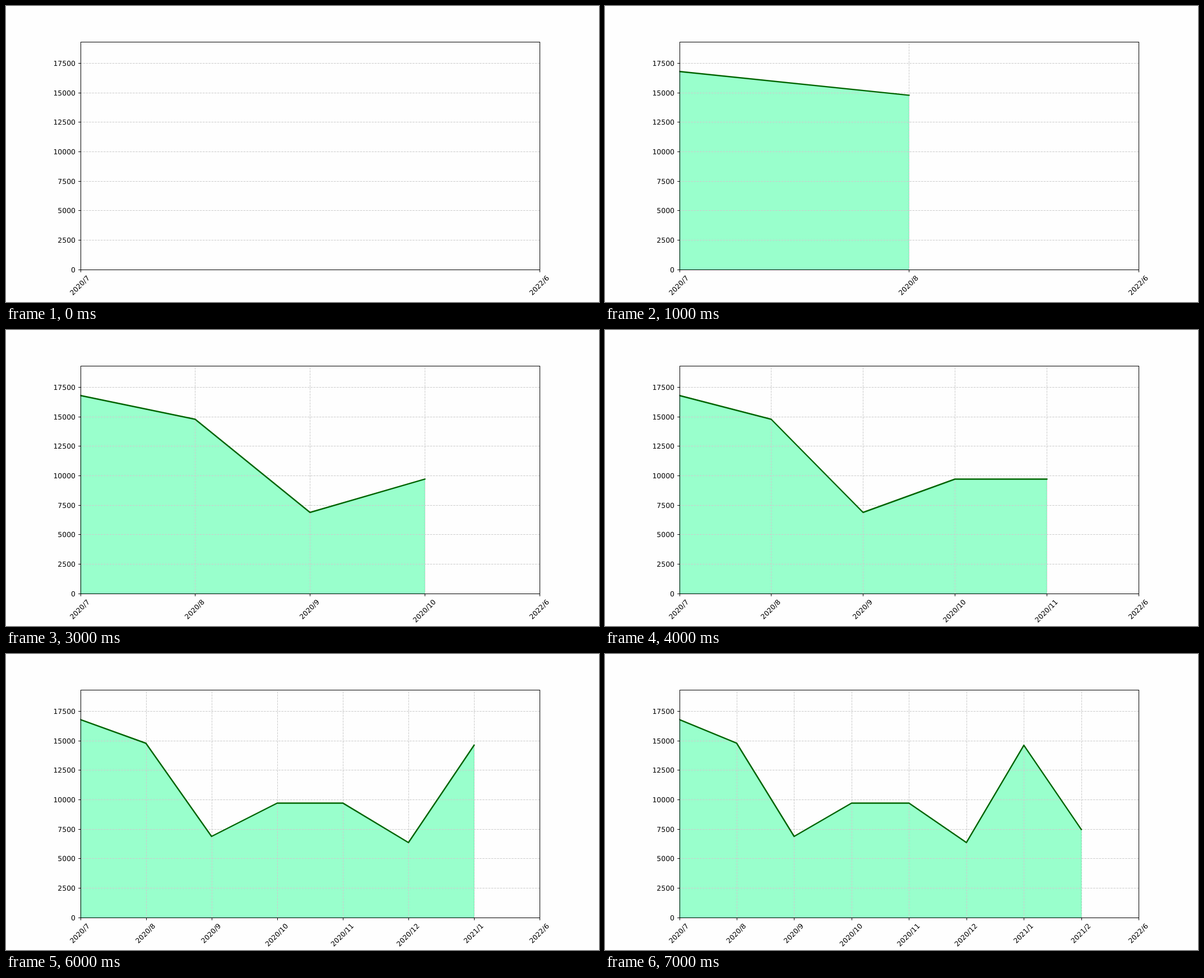
Write an HTML page with a canvas that moves like this. It is 1058 px wide and 529 px high and loops after 8000 ms.

```html
<!DOCTYPE html>
<html lang="en">
<head>
<meta charset="utf-8">
<title>Monthly values</title>
<style>
  html, body { margin: 0; width: 100%; height: 100%; overflow: hidden; background: #fefefe; }
  canvas { display: block; width: 1058px; height: 529px; }
</style>
</head>
<body>
<canvas id="chart" width="1058" height="529"></canvas>
<script>
const ctx = document.getElementById('chart').getContext('2d');

const LEFT = 132.5, RIGHT = 952.25, TOP = 64, BOTTOM = 471;
const Y_STEP = 2500, Y_GAP = 52.62;
const TICK = 4.3, PAD = 8.6;
const STEP_MS = 1000, STEPS = 8;
const VALUES = [16817, 14800, 6889, 9716, 9720, 6367, 14630, 7476];

const snap = v => Math.round(v) + 0.5;
const yAt = v => BOTTOM - v / Y_STEP * Y_GAP;
const month = i => `${2020 + Math.floor((i + 6) / 12)}/${(i + 6) % 12 + 1}`;

function line(x1, y1, x2, y2) {
  ctx.beginPath();
  ctx.moveTo(x1, y1);
  ctx.lineTo(x2, y2);
  ctx.stroke();
}

// Centres the rotated text box under the tick.
function slantedLabel(text, x) {
  const w = ctx.measureText(text).width, h = 12.3, descent = 2.7;
  ctx.save();
  ctx.translate(x, BOTTOM + PAD + 0.6 + (w + h) * Math.SQRT1_2 / 2);
  ctx.rotate(-Math.PI / 4);
  ctx.textAlign = 'left';
  ctx.fillText(text, -w / 2, h / 2 - descent);
  ctx.restore();
}

// The translucent outline overlaps the fill and darkens its rim.
function drawArea(points) {
  const last = points[points.length - 1];
  ctx.fillStyle = ctx.strokeStyle = 'rgba(0, 255, 127, 0.4)';
  ctx.lineWidth = 1.22;
  ctx.beginPath();
  ctx.moveTo(LEFT, BOTTOM);
  points.forEach(p => ctx.lineTo(p.x, p.y));
  ctx.lineTo(last.x, BOTTOM);
  ctx.closePath();
  ctx.fill();
  ctx.stroke();
}

function drawCurve(points) {
  ctx.strokeStyle = '#006400';
  ctx.lineWidth = 2.45;
  ctx.lineJoin = 'round';
  ctx.lineCap = 'square';
  ctx.beginPath();
  points.forEach(p => ctx.lineTo(p.x, p.y));
  ctx.stroke();
}

function drawGrid(xs, ys) {
  ctx.strokeStyle = '#ccc';
  ctx.lineWidth = 1;
  ctx.setLineDash([3.63, 1.57]);
  ys.forEach(y => line(LEFT, y, RIGHT, y));
  xs.slice(1, -1).forEach(x => line(snap(x), BOTTOM, snap(x), TOP));
  ctx.setLineDash([]);
}

function drawPlot(points, xs, ys) {
  ctx.save();
  ctx.beginPath();
  ctx.rect(LEFT, TOP, RIGHT - LEFT, BOTTOM - TOP);
  ctx.clip();
  if (points.length > 1) drawArea(points);
  drawGrid(xs, ys);
  if (points.length > 1) drawCurve(points);
  ctx.restore();
}

function drawAxes(xs, ys) {
  ctx.strokeStyle = ctx.fillStyle = '#000';
  ctx.lineWidth = 1;
  ctx.strokeRect(snap(LEFT), snap(TOP), snap(RIGHT) - snap(LEFT), snap(BOTTOM) - snap(TOP));

  ctx.font = '12.4px "DejaVu Sans", sans-serif';
  ctx.textRendering = 'geometricPrecision';
  ctx.textAlign = 'right';
  ys.forEach((y, i) => {
    line(snap(LEFT) - TICK, y, snap(LEFT), y);
    ctx.fillText(i * Y_STEP, LEFT - PAD, y + 4.6);
  });
  xs.forEach((x, i) => {
    line(snap(x), BOTTOM, snap(x), snap(BOTTOM) + TICK);
    slantedLabel(i < xs.length - 1 ? month(i) : '2022/6', x - 0.4);
  });
}

function draw(step) {
  const gap = (RIGHT - LEFT) / (step + 1);
  const xs = Array.from({ length: step + 2 }, (_, i) => LEFT + i * gap);
  const ys = Array.from({ length: 8 }, (_, i) => Math.floor(yAt(i * Y_STEP)) + 0.5);
  const points = VALUES.slice(0, step + 1).map((v, i) => ({ x: xs[i], y: yAt(v) }));

  ctx.fillStyle = '#fefefe';
  ctx.fillRect(0, 0, 1058, 529);
  drawPlot(points, xs, ys);
  drawAxes(xs, ys);
}

const start = performance.now();
let shown = -1;

function tick() {
  const step = Math.floor((performance.now() - start) / STEP_MS) % STEPS;
  if (step !== shown) draw(shown = step);
  requestAnimationFrame(tick);
}
tick();
</script>
</body>
</html>
```
